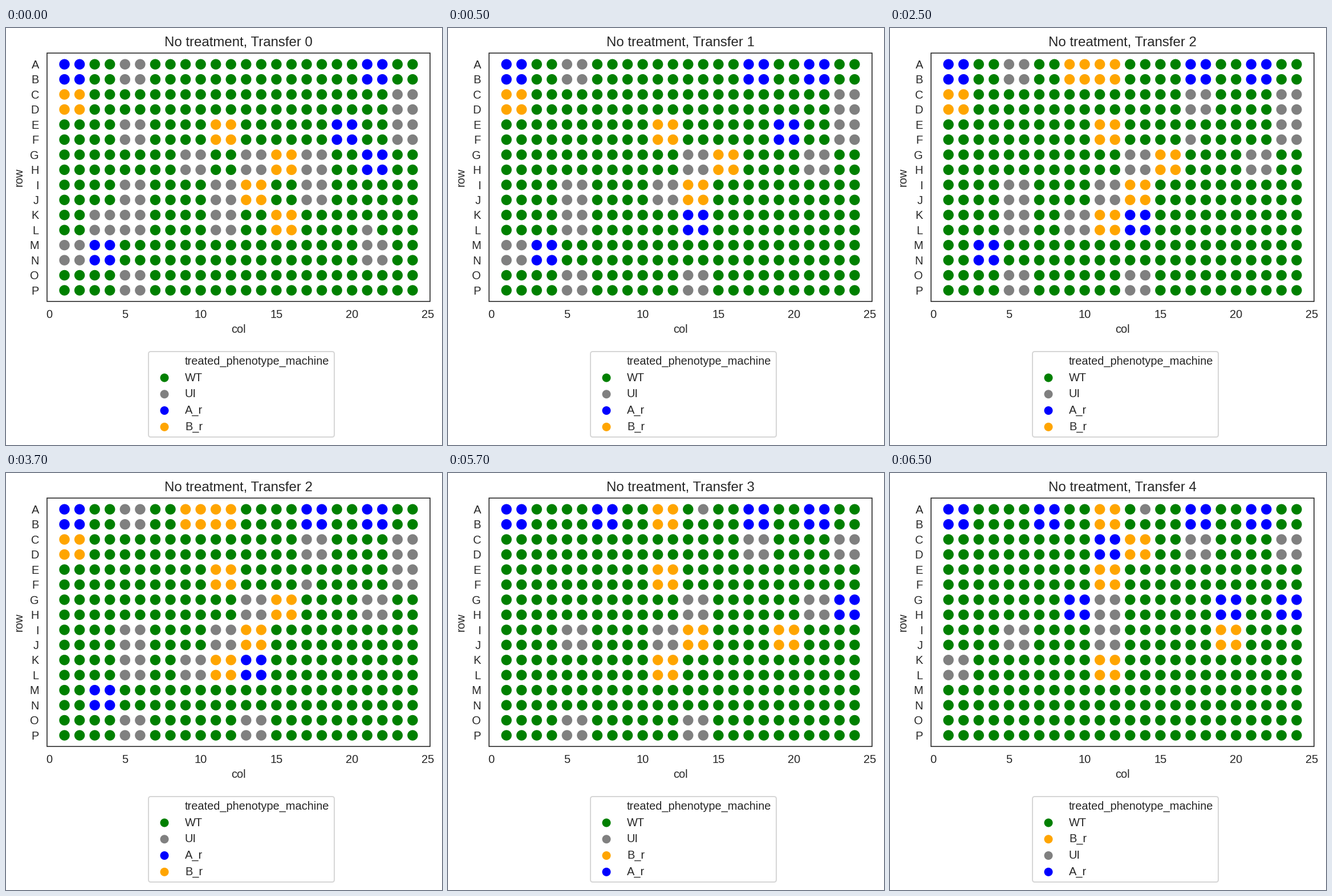
Write a matplotlib script that moves like this. It is 765 px wide and 732 px high and loops after 8000 ms.

```python
import matplotlib.pyplot as plt
from matplotlib.animation import FuncAnimation
from matplotlib.patches import FancyBboxPatch, Rectangle

WIDTH, HEIGHT, DPI = 765, 732, 96
PT = 72 / DPI  # points per pixel
INK = "0.15"
COLORS = {"WT": "green", "UI": "gray", "A_r": "blue", "B_r": "orange"}
ROWS = "ABCDEFGHIJKLMNOP"
COLS = range(1, 25)

# Capital letter: 2x2 block whose top left well is named; small letter: one well.
# Key order is the legend order.
PLATES = [
    {"UI": "A5 C23 E5 E23 G9 G13 G17 I5 I11 I17 K3 K5 K11 l21 M1 M21 O5",
     "A_r": "A1 A21 E19 G21 M3",
     "B_r": "C1 E11 G15 I13 K15"},
    {"UI": "A5 C23 E23 G13 G21 I5 I11 K5 M1 O5 O13",
     "A_r": "A1 A17 A21 E19 K13 M3",
     "B_r": "C1 E11 G15 I13"},
    {"UI": "A5 C17 C23 E23 f17 G13 G21 I5 I11 K5 K9 O5 O13",
     "A_r": "A1 A17 A21 K13 M3",
     "B_r": "A9 A11 C1 E11 G15 I13 K11"},
    {"UI": "a14 C17 C23 G13 G21 I5 I11 O5 O13",
     "B_r": "A11 E11 I13 I19 K11",
     "A_r": "A1 A7 A17 A21 G23"},
    {"B_r": "A11 C13 E11 I19 K11",
     "UI": "a14 C17 C23 G11 I5 I11 K1",
     "A_r": "A1 A7 A17 A21 C11 G9 G19 G23"},
]
STEP_MS = 500
HOLDS = [1, 4, 4, 4, 3]
TIMELINE = [i for i, n in enumerate(HOLDS) for _ in range(n)]

plt.rcParams["font.family"] = "Liberation Sans"
fig = plt.figure(figsize=(WIDTH / DPI, HEIGHT / DPI), dpi=DPI, facecolor="white")
ax = fig.add_axes([0, 0, 1, 1])
ax.set(xlim=(0, WIDTH), ylim=(HEIGHT, 0))
ax.axis("off")


def col_x(col):
    return 408 + (col - 12.5) * 26.56


def row_y(row):
    return 262.1 + (row - 7.5) * 26.45


def label(x, y, text, size=20, ha="center", **kw):
    return ax.text(x, y, text, fontsize=size * PT, color=INK, ha=ha, va="baseline", **kw)


def dots(xs, ys, diameter, edge, edge_width):
    return ax.scatter(xs, ys, s=(diameter * PT) ** 2, c=["green"] * len(xs),
                      edgecolors=edge, linewidths=edge_width * PT)


def well_colors(plate):
    colors = {(r, c): COLORS["WT"] for r in range(len(ROWS)) for c in COLS}
    for kind, places in plate.items():
        for place in places.split():
            span = 2 if place[0].isupper() else 1
            r0, c0 = ROWS.index(place[0].upper()), int(place[1:])
            for r in range(r0, r0 + span):
                for c in range(c0, c0 + span):
                    colors[r, c] = COLORS[kind]
    return list(colors.values())


# Plate frame and axis labels
ax.add_patch(Rectangle((72, 44), 672, 436, fill=False, ec=INK, lw=1.6 * PT))
for r, name in enumerate(ROWS):
    label(58, round(row_y(r) + 7.2), name, ha="right")
for c in range(0, 26, 5):
    label(col_x(c), 509, str(c))
label(408, 535, "col")
label(29, 262, "row", rotation=90, rotation_mode="anchor")
title = label(408, 32, "", size=24)

wells = dots([col_x(c) for _ in ROWS for c in COLS],
             [row_y(r) for r in range(len(ROWS)) for _ in COLS], 20, "white", 1.6)

# Legend
ax.add_patch(FancyBboxPatch((250, 568), 326, 150, boxstyle="round,pad=0,rounding_size=4",
                            fc="white", ec="0.84", lw=2 * PT))
label(314, 591, "treated_phenotype_machine", ha="left")
keys = dots([278] * 4, [614 + 28.77 * i for i in range(4)], 12, "face", 3)
key_names = [label(314, round(619.7 + 28.7 * i), "", ha="left") for i in range(4)]


def update(frame):
    step = TIMELINE[frame]
    plate = PLATES[step]
    kinds = ["WT", *plate]
    title.set_text(f"No treatment, Transfer {step}")
    wells.set_facecolor(well_colors(plate))
    keys.set_facecolor([COLORS[k] for k in kinds])
    for text, kind in zip(key_names, kinds):
        text.set_text(kind)
    return [title, wells, keys, *key_names]


anim = FuncAnimation(fig, update, frames=len(TIMELINE), interval=STEP_MS,
                     repeat=True, repeat_delay=0, blit=False)
plt.show()
```
